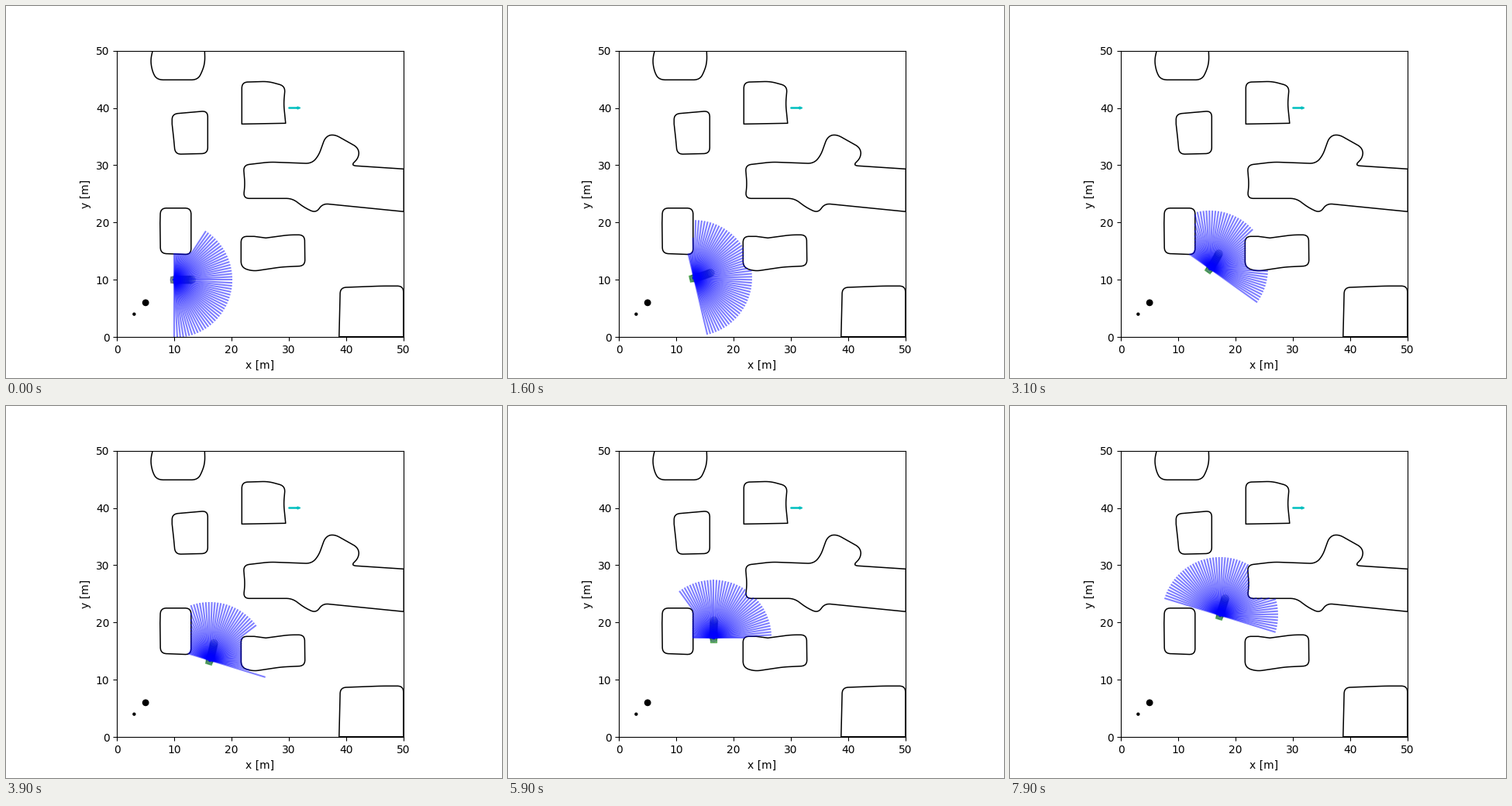
A matplotlib script that plays this animation: 640x480 px, repeating every 8 s.

```python
import numpy as np
import matplotlib.pyplot as plt
from matplotlib.animation import FuncAnimation
from matplotlib.collections import LineCollection
from matplotlib.patches import Circle, Polygon

SCALE = 7.392      # pixels per metre
RANGE = 10.0
BEAMS = np.radians(np.linspace(-90, 90, 61))

# Obstacle corners in stage pixels; all but the first and last get rounded.
OUTLINES = [
    [(189, 57), (186, 70), (189, 86), (195, 95), (247, 95), (253, 84),
     (256.5, 72), (256, 57)],
    [(304, 152), (304, 98), (338, 97), (360, 103), (358, 126), (360.5, 151)],
    [(214, 152), (214, 139), (260, 135), (260, 190), (218, 191), (216, 170)],
    [(198.5, 280), (199, 260.5), (238.5, 260.5), (238.5, 320.5), (199, 319)],
    [(513, 210), (444, 205.5), (455, 196), (455, 183), (423, 165), (412, 168),
     (403, 193), (394, 203), (340, 201), (306, 205), (308, 230), (306, 248),
     (369, 248), (385, 260), (400, 267), (408, 254.5), (513, 265)],
    [(335, 299), (365, 295), (385, 295), (385.5, 335), (355, 336.5),
     (318, 342), (303, 337), (303, 297), (320, 297)],
    [(429.5, 426.5), (431, 363), (484, 361), (512.5, 361), (512.5, 426.5)],
]


def rounded(points, r=7):
    p = np.array(points, float)
    u = np.linspace(0, 1, 6)[:, None]
    out = [p[:1]]
    for a, b, c in zip(p, p[1:], p[2:]):
        ab, cb = a - b, c - b
        s = b + ab * min(r / np.hypot(*ab), 0.5)
        e = b + cb * min(r / np.hypot(*cb), 0.5)
        mid = b + 0.1 * ((s + e) / 2 - b)
        out.append((1 - u) ** 2 * s + 2 * u * (1 - u) * mid + u ** 2 * e)
    return np.vstack(out + [p[-1:]])


def to_map(p):
    p = p + 0.3
    return np.column_stack([(p[:, 0] - 143.2) / SCALE, (427.2 - p[:, 1]) / SCALE])


def hermite(t, keys, vals, slopes):
    i = min(np.searchsorted(keys, t, side="right") - 1, len(keys) - 2)
    w = keys[i + 1] - keys[i]
    u = (t - keys[i]) / w
    return ((1 + 2 * u) * (1 - u) ** 2 * vals[i] + u * (1 - u) ** 2 * w * slopes[i]
            + u * u * (3 - 2 * u) * vals[i + 1] + u * u * (u - 1) * w * slopes[i + 1])


TURN_KEYS = np.array([0, 9, 18, 27, 36, 46, 58, 63, 72, 78])
TURNS = np.radians([0, 2.5, 20.5, 46.5, 69, 85, 90, 83.5, 73.5, 73])
TURN_RATES = np.gradient(TURNS, TURN_KEYS)


def heading(t):
    return hermite(t, TURN_KEYS, TURNS, TURN_RATES)


def ahead(a):
    return np.array([np.cos(a), np.sin(a)])


PATH_KEYS = np.array([0, 9, 22, 30, 46, 58, 78])
PATH = np.array([(10, 10), (11.85, 10.1), (14.45, 10.85), (15.53, 11.95),
                 (16.48, 15.05), (16.5, 17.3), (17.29, 21.28)])
PATH_RATES = np.array([0.2 * ahead(heading(k)) for k in PATH_KEYS])

shapes = [to_map(rounded(o)) for o in OUTLINES]
# The last corner of the fourth block sits on its closing edge.
shapes[3] = to_map(rounded(OUTLINES[3] + OUTLINES[3][:1]))
starts = np.vstack(shapes)
edges = np.vstack([np.roll(s, -1, axis=0) for s in shapes]) - starts


def cross(a, b):
    return a[..., 0] * b[..., 1] - a[..., 1] * b[..., 0]


def scan(pos, yaw):
    """End points of all beams, stopped at the nearest wall."""
    d = ahead(yaw + BEAMS).T
    rel = starts - pos
    den = cross(d[:, None], edges[None])
    den = np.where(np.abs(den) < 1e-9, 1e-9, den)
    dist = cross(rel, edges)[None] / den
    along = cross(rel[None], d[:, None]) / den
    hit = (dist > 0) & (along >= 0) & (along <= 1)
    reach = np.where(hit, dist, RANGE).min(axis=1).clip(max=RANGE)
    return pos + d * reach[:, None]


fig, ax = plt.subplots(figsize=(6.4, 4.8), dpi=100)
ax.set_aspect("equal")
ax.set(xlim=(0, 50), ylim=(0, 50), xlabel="x [m]", ylabel="y [m]")
ax.set_xticks(range(0, 51, 10))
ax.set_yticks(range(0, 51, 10))

for s in shapes:
    ax.add_patch(Polygon(s, fill=False, ec="black", lw=1.1, joinstyle="round"))
for spot, r in [((5, 6), 0.5), ((3, 4), 0.2)]:
    ax.add_patch(Circle(spot, r, color="black"))
ax.arrow(30, 40, 1.5, 0, width=0.15, head_width=0.4, head_length=0.5, color="c")

CORNERS = np.array([(-0.75, -0.55), (0.4, -0.55), (0.4, 0.55), (-0.75, 0.55)])
body = ax.add_patch(Polygon(CORNERS, color="green", alpha=0.5, lw=1,
                            joinstyle="round"))
REACH = np.linspace(0, 3, 11)
discs = [ax.add_patch(Circle((0, 0), 0.65, fc=(0, 0.25, 0.4, 0.18),
                             ec=(0, 0.15, 0.3, 0.3), lw=1)) for _ in REACH]
beams = ax.add_collection(LineCollection([], colors="blue", alpha=0.5, lw=1.5,
                                         capstyle="projecting", zorder=2))


def draw(frame):
    t = max(frame - 1, 0)
    pos = hermite(t, PATH_KEYS, PATH, PATH_RATES)
    yaw = heading(t)
    beams.set_segments([(pos, end) for end in scan(pos, yaw)])

    c, s = ahead(yaw)
    body.set_xy(pos + CORNERS @ np.array([(c, s), (-s, c)]))
    body.set_color("green" if t else "dimgray")

    # The planned discs bend a little towards the coming turn.
    bend = 0.9 * (heading(min(t + 1, 78)) - heading(max(t - 1, 0)))
    for disc, d in zip(discs, REACH):
        disc.center = pos + d * ahead(yaw + bend * d / 3)
    return [beams, body, *discs]


anim = FuncAnimation(fig, draw, frames=80, interval=100, repeat=True,
                     repeat_delay=0, blit=False)
plt.show()
```
